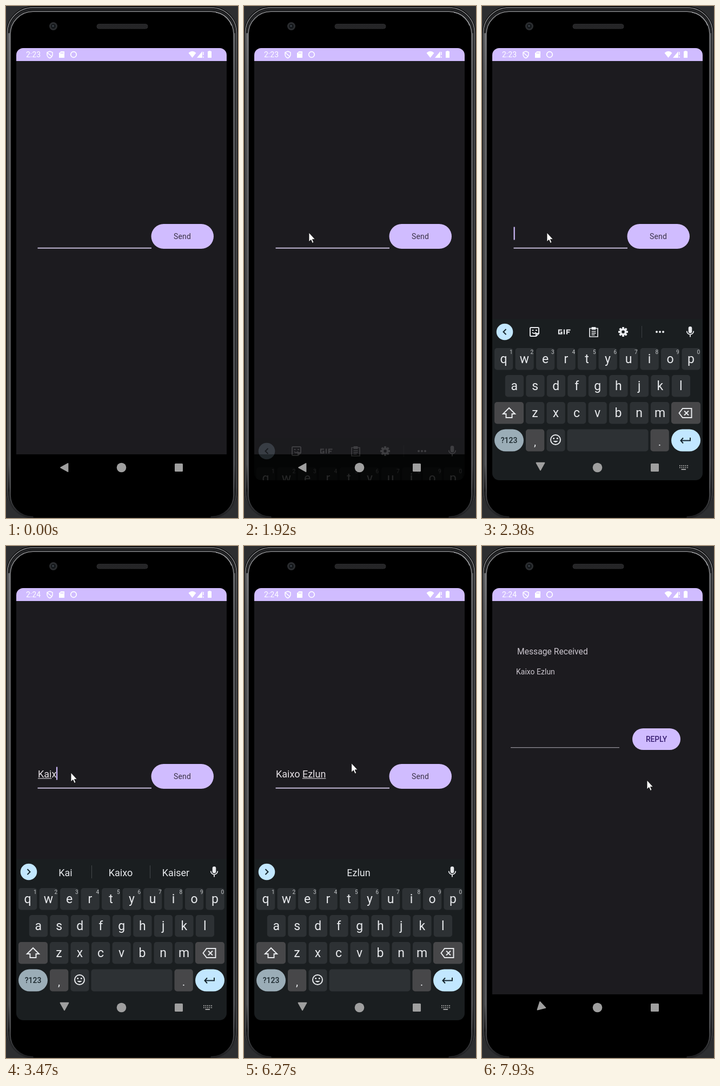
An HTML page that plays this animation: 429x949 px, repeating every 7990 ms.

```html
<!DOCTYPE html>
<html lang="en">
<head>
<meta charset="utf-8">
<title>Message demo</title>
<style>
html,body{margin:0;width:100%;height:100%;overflow:hidden;background:#2d2e30}
svg{display:block;width:429px;height:949px;font-family:Roboto,sans-serif}
text{white-space:pre}
.mid{text-anchor:middle}
.line{fill:none;stroke:#e8eaed;stroke-width:2}
.dark{fill:none;stroke:#15252e;stroke-width:2}
</style>
</head>
<body>
<svg id="stage" viewBox="0 0 429 949" xmlns="http://www.w3.org/2000/svg"></svg>
<script>
const LOOP = 7990, STEP = 66.7;
const rect = (x, y, w, h, r, fill, more = '') =>
  `<rect x="${x}" y="${y}" width="${w}" height="${h}" rx="${r}" fill="${fill}" ${more}/>`;
const label = (x, y, size, fill, str, more = '') =>
  `<text x="${x}" y="${y}" font-size="${size}" fill="${fill}" ${more}>${str}</text>`;
const path = (d, more = 'class="line"') => `<path d="${d}" ${more}/>`;
const circle = (x, y, r, more) => `<circle cx="${x}" cy="${y}" r="${r}" ${more}/>`;
const at = (x, y, body) => `<g transform="translate(${x} ${y})">${body}</g>`;
const MID = 'class="mid"', WHITE = '#e8eaed', LILAC = '#d0bcff';

// Phone outline inset by x and y, open along the bottom
function edge(x, y, r, stroke, w) {
  const arc = (ex, ey) => `A${r} ${r} 0 0 1 ${ex} ${ey}`, R = 429 - x, B = 948;
  return path(`M${x + r} ${B}${arc(x, B - r)}V${y + r}${arc(x + r, y)}H${R - r}${arc(R, y + r)}V${B - r}${arc(R - r, B)}`,
    `fill="none" stroke="${stroke}" stroke-width="${w}"`);
}

function phone() {
  return `<defs>
    <linearGradient id="side" x1="0" y1="0" x2="0" y2="1">
      <stop offset="0" stop-color="#8d8e91"/><stop offset=".12" stop-color="#77787b"/>
      <stop offset=".6" stop-color="#66676a"/><stop offset=".94" stop-color="#66676a"/>
      <stop offset="1" stop-color="#1a1a1c"/></linearGradient>
    <pattern id="mesh" width="3" height="3" patternUnits="userSpaceOnUse">
      <rect width="3" height="3" fill="#343436"/>
      <path d="M0 0h1.5v1.5H0zM1.5 1.5H3V3H1.5z" fill="#161617"/></pattern>
    <clipPath id="screen"><rect x="19" y="78" width="389" height="801" rx="13"/></clipPath>
    <clipPath id="pill"><rect x="268.5" y="404" width="115.5" height="46" rx="23"/></clipPath>
  </defs>
  <rect width="429" height="949" fill="#2d2e30"/>
  ${rect(.5, .5, 428, 948, 50, '#000')}
  ${edge(2.5, 3, 47, 'url(#side)', 1.6)}
  ${edge(5.5, 6.5, 45, '#232426', 4)}
  ${rect(4, 50, 3.5, 850, 1.5, 'url(#side)', 'opacity=".75"')}
  ${rect(422, 50, 2, 850, 1, 'url(#side)', 'opacity=".5"')}
  ${edge(8, 10.3, 42, 'url(#side)', 1.5)}
  ${path('M388 12Q409 15 417 36', 'fill="none" stroke="#a3a4a7" stroke-width="1.2"')}
  ${circle(87.5, 37.5, 7.5, 'fill="#2b2d30"')}
  ${circle(87.5, 37.5, 4.5, 'fill="#14171a"')}
  ${circle(87, 37, 1.8, 'fill="#3c434a"')}
  ${rect(168, 33.5, 94, 8.5, 4, 'url(#mesh)', 'stroke="#2b2b2d"')}`;
}

function statusBar() {
  return rect(19, 78, 389, 24, 0, LILAC) +
    label(37, 95, 14, '#fff', '2:23', 'id="clock"') +
    path('M81 84L86 86V90Q86 94.500 81 96.500Q76 94.500 76 90V86ZM77 87L85 94', 'fill="none" stroke="#fff" stroke-width="1.5"') +
    path('M101.500 84H108V96H98V87.500Z', 'fill="#fff"') +
    path('M101.500 86v2.500M103.500 86v2.500M105.500 86v2.500', `stroke="${LILAC}"`) +
    circle(125, 90, 5.3, 'fill="none" stroke="#fff" stroke-width="1.7"') +
    path('M337.500 87Q344.500 80.500 351.500 87L344.500 96Z', 'fill="#fff"') +
    path('M353 96L363 84V96Z', 'fill="#fff"') +
    path('M365 85v6M365 93.500v2.500', 'stroke="#fff" stroke-width="1.5"') +
    path('M374.700 84V83H378.300V84H380V96H373V84Z', 'fill="#fff"');
}

function compose() {
  return `<g id="compose">
    ${label(59, 429, 18, '#e6e1e5', '', 'id="entry"')}
    ${rect(59, 430.3, 0, 1.1, 0, '#e6e1e5', 'id="under"')}
    ${rect(58.5, 447.7, 210.5, 2, 0, '#c2b8d6')}
    ${rect(58.5, 409.5, 2.3, 24, 0, '#c9b6f5', 'id="caret"')}
    <g clip-path="url(#pill)">${rect(268, 404, 117, 46, 0, LILAC)}
      ${circle(304, 434, 0, 'id="ripple" fill="#381e72"')}</g>
    ${label(326, 432, 14, '#3a3247', 'Send', MID + ' letter-spacing=".1"')}</g>`;
}

function received() {
  return `<g id="received">${rect(19, 102, 389, 729, 0, '#1c1b1f')}
    ${label(65, 200.5, 15.7, '#cac5cd', 'Message Received')}
    ${label(63, 238, 14, '#cac5cd', 'Kaixo Ezlun')}
    ${rect(53, 373, 201, 1.2, 0, '#98949d')}
    ${rect(278, 338, 89, 40, 20, LILAC)}
    ${label(322.5, 363, 13.8, '#381e72', 'REPLY', MID + ' font-weight="500"')}</g>`;
}

function keyboard() {
  const pitch = 38.5, key = '#2d3134', grey = '#474749';
  const row = (chars, x, y) => [...chars].map((c, i) =>
    rect(x + i * pitch, y, 34.3, 40.5, 5, key) +
    label(x + 17 + i * pitch, y + 27.5, 23, WHITE, c, MID)).join('');
  const digits = [...'1234567890'].map((c, i) =>
    label(53.7 + i * pitch, 645, 10, '#c4c7c9', c, MID)).join('');
  const gear = [0, 45, 90, 135].map(a =>
    `<rect x="-2" y="-9" width="4" height="18" rx="1" fill="${WHITE}" transform="rotate(${a})"/>`).join('') +
    circle(0, 0, 6.5, `fill="${WHITE}"`) + circle(0, 0, 2.8, 'fill="#1a1e20"');
  const tools = `<g id="tools">
    ${at(97, 604, path('M-6.500-8H6.500Q8-8 8-6.500V3L3 8H-6.500Q-8 8-8 6.500V-6.500Q-8-8-6.500-8ZM8 3H3V8') + path('M-4 1Q-1 5 3 1M-4.500-3h3M2-3h3'))}
    ${at(152, 604, path('M-4-3.500H-10V3.500H-4.500V.5H-7M0-4.500V4.500M5 4.500V-3.500H11.500M5 .5H10', 'class="line" style="stroke-width:2.2"'))}
    ${at(206.5, 604.5, path('M-7.500-7H7.500V8.500H-7.500ZM-4-1.500H4M-4 1.800H4M-4 5H2', 'class="line" style="stroke-width:1.7"') + rect(-4, -9.5, 8, 5, 1, WHITE))}
    ${at(261, 604, gear)}
    ${rect(295, 593, 1, 22, 0, '#3c4043')}
    ${[323, 329, 335].map(x => circle(x, 604, 2, `fill="${WHITE}"`)).join('')}</g>`;
  const strip = `<g id="strip"><g id="bars">${rect(158, 592, 1, 24, 0, '#44484b')}${rect(266, 592, 1, 24, 0, '#44484b')}</g>
    ${[110, 212, 314].map((x, i) => label(x, 611.5, 18, WHITE, '', `${MID} id="hint${i}"`)).join('')}</g>`;
  return `<g id="keys">${rect(19, 580, 389, 300, 0, '#1a1e20')}
    ${circle(42, 604, 15.3, 'fill="#c2e7ff"')}
    ${at(42, 604, path('M2.500-5L-2.500 0L2.500 5', 'class="dark" id="chevron"'))}
    ${tools}${strip}
    ${at(385, 604, rect(-3.3, -10, 6.6, 12.5, 3.3, WHITE) + path('M-6.300-1.500A6.300 6.300 0 0 0 6.300-1.500M0 5V9.500', 'class="line" style="stroke-width:1.8"'))}
    ${row('qwertyuiop', 23, 634)}${digits}${row('asdfghjkl', 42.8, 684)}${row('zxcvbnm', 81, 734)}
    ${rect(23, 734, 54, 40.5, 5, grey)}${at(50, 754, path('M0-9L-11 2H-5.500V9H5.500V2H11Z'))}
    ${rect(350, 734, 54, 40.5, 5, grey)}${at(376.5, 754.5, path('M-12 0L-5.500-8.500H11V8.500H-5.500ZM-2.500-4L5.500 4M5.500-4L-2.500 4'))}
    ${rect(23, 784.5, 54, 41, 20.5, '#9badb7')}
    ${label(50, 810, 14, '#1c282e', '?123', MID + ' font-weight="500"')}
    ${rect(81, 784.5, 34.3, 41, 5, grey)}${label(98, 815, 21, WHITE, ',', MID)}
    ${rect(119.5, 784.5, 34, 41, 5, key)}
    ${at(136, 804, circle(0, 0, 9, 'class="line"') + circle(-3.3, -2.5, 1.5, `fill="${WHITE}"`) + circle(3.3, -2.5, 1.5, `fill="${WHITE}"`) + path('M-4.500 2Q0 7.500 4.500 2Z', `fill="${WHITE}"`))}
    ${rect(157.5, 784.5, 150, 41, 5, key)}
    ${rect(311.5, 784.5, 34.3, 41, 5, grey)}${label(328.5, 815, 21, WHITE, '.', MID)}
    ${rect(350, 784.5, 54, 41, 20.5, '#c2e7ff')}${at(376.5, 805, path('M8.500-5V.5H-9M-4.500-4.500L-9 .5L-4.500 5.500', 'class="dark"'))}</g>`;
}

function navBar() {
  const grey = '#9f9f9f';
  return `<path id="back" d="M-9 0L4.500-7.500V7.500Z" fill="${grey}" stroke="${grey}" stroke-width="1.8" stroke-linejoin="round"/>
    ${circle(213.5, 855.5, 8.8, `fill="${grey}"`)}
    ${rect(312, 848, 15, 15, 1.5, grey)}
    <g id="ime" fill="none" stroke="${grey}" stroke-width="1.8">
      <path d="M365 852H381M365 855.500H381" stroke-dasharray="1.800 1.750"/><path d="M368.500 859H377"/></g>`;
}

document.getElementById('stage').innerHTML = phone() + `<g clip-path="url(#screen)">
  ${rect(19, 78, 389, 753, 0, '#1c1b1f')}${rect(19, 831, 389, 48, 0, '#000')}
  ${statusBar()}${compose()}${received()}${keyboard()}${navBar()}</g>
  <path id="mouse" d="M.5 0V17L4.300 13.400L6.900 19.400L9.500 18.300L7 12.400H12Z" fill="#fff" stroke="#111" stroke-width=".9"/>`;

const el = {};
document.querySelectorAll('svg [id]').forEach(n => el[n.id] = n);
const set = (id, o) => { for (const k in o) el[id].setAttribute(k, o[k]); };
const show = (id, on) => { el[id].style.display = on ? '' : 'none'; };
const pen = document.createElement('canvas').getContext('2d');
const width = s => { pen.font = '18px Roboto, sans-serif'; return pen.measureText(s).width; };

const clamp = u => Math.min(1, Math.max(0, u));
const part = (t, a, b) => clamp((t - a) / (b - a));
const smooth = u => u * u * (3 - 2 * u);
const mix = (a, b, u) => a + (b - a) * u;
const held = (t, start) => start + Math.floor((t - start + 4) / STEP) * STEP;
const last = (list, t) => list.filter(e => e[0] <= t).pop();

const typed = [[0, ''], [2580, 'K'], [2910, 'Ka'], [3140, 'Kai'], [3470, 'Kaix'], [3800, 'Kaixo'],
  [4070, 'Kaixo '], [4400, 'Kaixo E'], [4600, 'Kaixo Ez'], [4670, 'Kaixo Ezl'],
  [4870, 'Kaixo Ezlu'], [5140, 'Kaixo Ezlun']];
// time, underlined word, suggestions
const hints = [[0, ''], [2710, 'K', 'K', 'Ki', 'Know'], [2980, 'Ka', 'Ka', 'Kan', 'Kale'],
  [3200, 'Kai', 'Kai', 'Kaixo', 'Kaiser'], [3660, 'Kaix', '', 'Kaixo', ''], [3870, 'Kaixo', '', 'Kaixo', ''],
  [4070, '', '', 'Kaixo', ''], [4200, '', 'I', 'the', 'and'], [4400, 'E', 'E', 'Ez', 'Eta'],
  [4670, 'Ezl', 'Ezl', 'Ez', 'Eta'], [4940, 'Ezlu', 'Ezl', 'Ezlun', 'Ezin'],
  [5140, 'Ezlu', 'Ezlu', 'Ezlun', 'Ezin'], [5330, 'Ezlun', 'Ezlu', 'Ezlun', 'Ezin'],
  [5400, 'Ezlun', '', 'Ezlun', '']];
const blinks = [[0, 0], [190, 1], [720, 0], [1190, 1], [1650, 0], [2250, 1], [5870, 0], [6400, 1], [6870, 0], [7400, 1]];

function mouseAt(t) {
  if (t < 390) return null;
  if (t < 720) return last([[390, [387, 925]], [460, [245, 650]], [520, [137, 479]]], t)[1];
  if (t < 1580) {
    const u = smooth(part(held(t, 720), 650, 1310));
    return [mix(137, 118, u), mix(479, 408, u)];
  }
  if (t < 1920) return [119, 413];
  const u = smooth(part(held(t, 6070), 6000, 6600));
  return [mix(119.5, 304.5, u), mix(420, 434, u) - 96 * u * (1 - u)];
}

function drawText(t) {
  const str = last(typed, t)[1], [, word, ...tips] = last(hints, t);
  el.entry.textContent = str;
  const from = str.startsWith('Kaixo ') ? width('Kaixo ') : 0;
  set('under', { x: 59 + from, width: width(word) });
  set('caret', { x: 58.5 + width(str) });
  show('caret', last(blinks, t)[1]);
  const open = t >= 2710;
  show('tools', !open);
  show('strip', open);
  show('bars', tips[0]);
  set('chevron', { transform: open ? 'scale(-1 1)' : '' });
  tips.forEach((s, i) => el['hint' + i].textContent = s);
  el.clock.textContent = t < 3050 ? '2:23' : '2:24';
}

function drawKeys(t) {
  const a = held(t, 1920), z = held(t, 7600);
  show('keys', t >= 1920 && t < 7920);
  const rise = 221 * Math.pow(1 - part(a, 1920, 2085), 2.3);
  const drop = 260 * Math.pow(part(z, 7640, 7930), 1.7);
  set('keys', {
    transform: `translate(0 ${rise + drop})`,
    opacity: Math.min(mix(.17, 1, part(a, 1920, 2010)), 1 - part(z, 7730, 7920))
  });
  const turn = smooth(part(a, 1920, 2215)) * (1 - smooth(part(z, 7795, 8065)));
  set('back', { transform: `translate(${mix(110, 108, turn)} ${mix(855.5, 851.2, turn)}) rotate(${-90 * turn})` });
  show('ime', t >= 1980 && t < 7860);
}

function draw(t) {
  drawText(t);
  drawKeys(t);
  const p = held(t, 6800);
  set('ripple', {
    r: t < 6800 ? 0 : mix(18, 95, part(p, 6800, 7130)),
    opacity: .1 * part(p, 6740, 6940) * (1 - part(p, 7270, 7530))
  });
  const enter = part(held(t, 7600), 7540, 7880);
  show('received', t >= 7600);
  set('received', { opacity: smooth(enter) });
  const pos = mouseAt(t);
  show('mouse', pos);
  if (pos) set('mouse', { transform: `translate(${pos[0]} ${pos[1]})` });
}

const begin = performance.now();
function tick() {
  draw((performance.now() - begin) % LOOP);
  requestAnimationFrame(tick);
}
draw(0);
requestAnimationFrame(tick);
</script>
</body>
</html>
```
